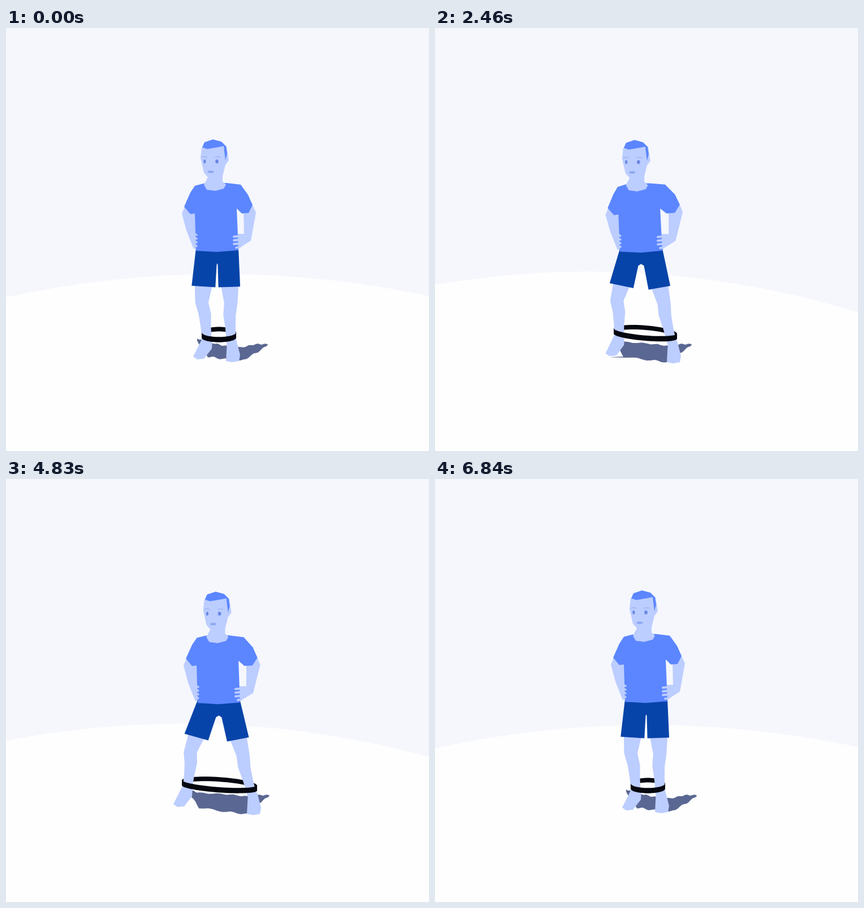
These frames come from a looping animation (748x748 px, 6.87 s). An HTML page with a canvas:

```html
<!DOCTYPE html>
<html lang="en">
<head>
<meta charset="utf-8">
<title>Lateral band steps</title>
<style>
html, body { margin: 0; width: 100%; height: 100%; overflow: hidden; background: #f5f7fd; }
canvas { display: block; width: 748px; height: 748px; }
</style>
</head>
<body>
<canvas id="stage" width="748" height="748"></canvas>
<script>
const ctx = document.getElementById('stage').getContext('2d');
const LOOP = 6870, STEP = 30;
const SKIN = '#bccdff', SHIRT = '#5b86ff', SHORTS = '#0744a9', SHADOW = '#5a6792', BAND = '#05070f';

// Turning points of the head's sway: time, x
const sway = [[0, 366], [280, 357], [960, 405], [1880, 314], [2900, 378], [3330, 375],
  [3600, 383], [4450, 337], [5080, 388], [5830, 327], [6700, 366], [LOOP, 366]];

// Steps of each foot: start, end, sideways travel
const stepsL = [[840, 1400, -30], [2450, 2820, 36], [3560, 3980, -41], [4900, 5340, -12], [6080, 6560, 47]];
const stepsR = [[150, 520, 27], [1500, 1900, -23], [2100, 2440, 17], [4130, 4480, -14], [4480, 4760, 30], [5600, 5980, -37]];

const clamp = v => Math.max(0, Math.min(1, v));
const mix = (a, b, u) => a + (b - a) * u;
const ease = u => (1 - Math.cos(Math.PI * clamp(u))) / 2;
const mixPt = (a, b, u) => [mix(a[0], b[0], u), mix(a[1], b[1], u)];
const spin = (x, y, r) => [x * Math.cos(r) - y * Math.sin(r), x * Math.sin(r) + y * Math.cos(r)];
const pairs = s => s.split(' ').map(p => p.split(',').map(Number));

function swayAt(t) {
  const i = sway.findIndex(k => k[0] > t), [a, b] = [sway[i - 1], sway[i]];
  return mix(a[1], b[1], ease((t - a[0]) / (b[0] - a[0])));
}

function footAt(steps, t, side) {
  let travel = 0, lift = 0;
  for (const [from, to, dx] of steps) {
    const u = clamp((t - from) / (to - from));
    travel += dx * ease(u);
    lift += Math.sin(Math.PI * u);
  }
  const left = side < 0;
  return {
    side, lift,
    x: (left ? 354 : 400) + travel,
    y: (left ? 555 + travel * .17 : 557 + travel * .09) - lift * (left ? 13 : 17),
    tilt: -lift * (left ? .25 : .15)
  };
}

// Everything about a pose follows from the feet and the sway
function poseAt(t) {
  const l = footAt(stepsL, t, -1), r = footAt(stepsR, t, 1);
  const headX = swayAt(t), spread = r.x - l.x - 46, lift = Math.max(l.lift, r.lift);
  const waist = [373.5 + (headX - 366) * .45 + ((l.x + r.x) / 2 - 377) * .7, 394 + spread * .03 - lift * 4.5];
  const head = [headX, 197 + spread * .03 - lift * 5.5];
  const lean = headX - waist[0] + 7.5;
  const collar = [headX + 4 - lean * .2, head[1] + 91];
  const orbit = Math.pow(Math.sin(Math.PI * Math.pow(t / LOOP, .837)), 1.7);
  return { l, r, head, waist, collar, lean, spread, orbit };
}

function fill(points, color) {
  ctx.fillStyle = color;
  ctx.beginPath();
  points.forEach(p => ctx.lineTo(p[0], p[1]));
  ctx.closePath();
  ctx.fill();
}
function oval(x, y, rx, ry, color) {
  ctx.fillStyle = color;
  ctx.beginPath();
  ctx.ellipse(x, y, rx, ry, 0, 0, 7);
  ctx.fill();
}
function line(points, width, color) {
  ctx.strokeStyle = color;
  ctx.lineWidth = width;
  ctx.lineCap = 'round';
  ctx.beginPath();
  points.forEach(p => ctx.lineTo(p[0], p[1]));
  ctx.stroke();
}

// Outlines in the rest pose
const shirt = pairs('349,275 334,279 326,291 315,316 326,329 334,328 336,394 373,396 411,393 408,319 417,328 429,327 436,313 428,295 415,277 390,274');
const armL = pairs('318,312 311,328 319,358 332,391 338,388 336,325');
const armR = pairs('434,309 442,326 433,376 408,392 406,364 421,364 420,326');
const face = pairs('346,211 344,230 350,256 357,264 350,277 355,286 370,288 385,284 389,277 383,271 383,262 388,242 394,234 390,209');
const hair = pairs('347,211 351,202 366,197 381,201 389,209 391,222 388,234 385,209 356,214');
const footL = pairs('-7,-6 -17,14 -23,26 -16,31 -4,30 10,12 11,-6');
const footR = pairs('-9,-6 -11,32 0,34 12,32 14,21 7,-6');

// Leg half widths from hem to ankle: inner, outer
const legWidths = pairs('16,16 11,12.5 13.5,8.5 11,7 10,7');

function makeLeg(waist, foot) {
  const side = foot.side;
  const hip = [waist[0] + side * 19.5, waist[1] + 6], ankle = [foot.x, foot.y];
  const knee = mixPt(hip, ankle, .55);
  if (side < 0) knee[0] -= 7 + Math.max(0, 155 - Math.hypot(ankle[0] - hip[0], ankle[1] - hip[1])) * .7;
  const hem = mixPt(hip, knee, .67);
  const slope = (knee[0] - hip[0]) / (knee[1] - hip[1]);
  const spine = [mixPt(hip, knee, .6), knee, mixPt(knee, ankle, .3), mixPt(knee, ankle, .63), ankle];
  const edge = k => spine.map((p, i) => [p[0] + (k ? side : -side) * legWidths[i][k], p[1]]);
  const sole = (side < 0 ? footL : footR).map(p => {
    const [x, y] = spin(p[0], p[1], foot.tilt);
    return [ankle[0] + x, ankle[1] + y];
  });
  return { outline: [...edge(0), ...edge(1).reverse()], sole, hemAt: w => [hem[0] + w, hem[1] - w * slope * .75] };
}

function drawGround(orbit) {
  const left = 476 - 23 * orbit, top = 435 - 4.5 * orbit, right = 474 + 30 * orbit;
  const rise = Math.sqrt(left - top), bend = (rise + Math.sqrt(right - top)) / 748;
  ctx.fillStyle = '#f5f7fd';
  ctx.fillRect(0, 0, 748, 748);
  ctx.fillStyle = '#fefefe';
  ctx.beginPath();
  ctx.moveTo(0, left);
  ctx.quadraticCurveTo(374, left - 748 * bend * rise, 748, right);
  ctx.lineTo(748, 748);
  ctx.lineTo(0, 748);
  ctx.fill();
}

function drawShadow({ l, r, waist, spread }) {
  const start = l.x + Math.max(0, spread - 40) * .6, w = waist[0] + 2, grow = spread * .05;
  // Spine of the shadow: x, y, half thickness
  const spine = [[start - 16, 551, 2], [start + 3, 568, 13], [mix(l.x, r.x, .6), 573, 12 + grow],
    [Math.min(r.x + 16, w + 50), 577, 12 + grow], [w + 66, 567, 8], [w + 88, 560, 1]];
  const upper = [], lower = [];
  for (let i = 0; i < 30; i++) {
    const k = Math.floor(i / 6), u = i % 6 / 6, a = spine[k], b = spine[k + 1];
    const x = mix(a[0], b[0], u), y = mix(a[1], b[1], u), h = mix(a[2], b[2], u);
    upper.push([x, y - h + Math.sin(i * 1.7)]);
    lower.unshift([x, y + h + Math.sin(i * 1.3) * 1.5]);
  }
  fill([...upper, spine[5], ...lower], SHADOW);
  if (l.lift > .05) oval(l.x + 17, 582, 30, 10 * l.lift, SHADOW);
  if (r.lift > .05) oval(r.x - 9, 582, 27, 13 * r.lift, SHADOW);
}

function drawBand(l, r, front) {
  const a = [l.x - 8, l.y - 12 - l.lift * 11], b = [r.x + 7, r.y - 14 - r.lift * 4];
  const bow = front ? 8 : -10.5, half = front ? 4.7 : 4;
  const row = off => Array.from({ length: 33 }, (_, i) => {
    const p = mixPt(a, b, ease(i / 32));
    return [p[0], p[1] + bow * Math.sin(Math.PI * i / 32) + off];
  });
  fill([...row(-half), ...row(half).reverse()], BAND);
}

function drawHead(place) {
  fill(face.map(place), SKIN);
  fill(hair.map(place), SHIRT);
  for (const [x, rx, brow] of [[351.3, 2.1, 350.5], [373, 2.8, 374]]) {
    oval(...place([x, 236]), rx, 3.4, '#6888e2');
    line([[brow - 4, 228.5], [brow, 227.2], [brow + 5, 228.5]].map(place), 1.5, '#9fb6f7');
  }
  oval(...place([362, 254.3]), 5.8, 2.2, '#8da7f2');
}

function draw(t) {
  const pose = poseAt(t);
  const { l, r, head, waist, collar, lean, orbit } = pose;

  // Blend the chest and waist transforms by height
  const body = ([x, y]) => {
    const dx = x - 370;
    const push = -.5 * lean * clamp(Math.abs(dx) / 45) +
      (Math.max(lean, 0) + 9 * orbit) * clamp((dx - 38) / 25);
    const u = spin(dx + push, y - 288, lean * .0062);
    const d = spin(x - 373.5, y - 394, lean * .003);
    return mixPt([u[0] + collar[0], u[1] + collar[1]], [d[0] + waist[0], d[1] + waist[1]], clamp((y - 290) / 104));
  };
  const skull = ([x, y]) =>
    [x + mix(head[0] - 366, collar[0] - 370, clamp((y - 255) / 25)), y + head[1] - 197];

  drawGround(orbit);
  drawShadow(pose);
  drawBand(l, r, false);

  const legL = makeLeg(waist, l), legR = makeLeg(waist, r);
  for (const leg of [legL, legR]) {
    fill(leg.outline, SKIN);
    fill(leg.sole, SKIN);
  }
  drawBand(l, r, true);

  const gap = Math.max(1, Math.min(5, pose.spread * .08 + 1));
  fill([body([336, 389]), legL.hemAt(-21), legL.hemAt(21),
    [waist[0] - gap, waist[1] + 25], [waist[0], waist[1] + 22], [waist[0] + gap, waist[1] + 25],
    legR.hemAt(-20), legR.hemAt(18.5), body([411, 389])], SHORTS);

  fill(armL.map(body), SKIN);
  fill(armR.map(body), SKIN);
  fill(shirt.map(body), SHIRT);
  for (let i = 0; i < 4; i++) {
    const y = 365 + i * 6.5;
    line([[333, y - 1], [337, y + 1]].map(body), 3.6, SKIN);
    line([[413, y + 3], [403 + (i === 3 ? 4 : 0), y + 4]].map(body), 3.8, SKIN);
  }
  drawHead(skull);
}

const start = performance.now();
function tick() {
  const t = (performance.now() - start) % LOOP;
  draw(Math.floor(t / STEP) * STEP);
  requestAnimationFrame(tick);
}
tick();
</script>
</body>
</html>
```
